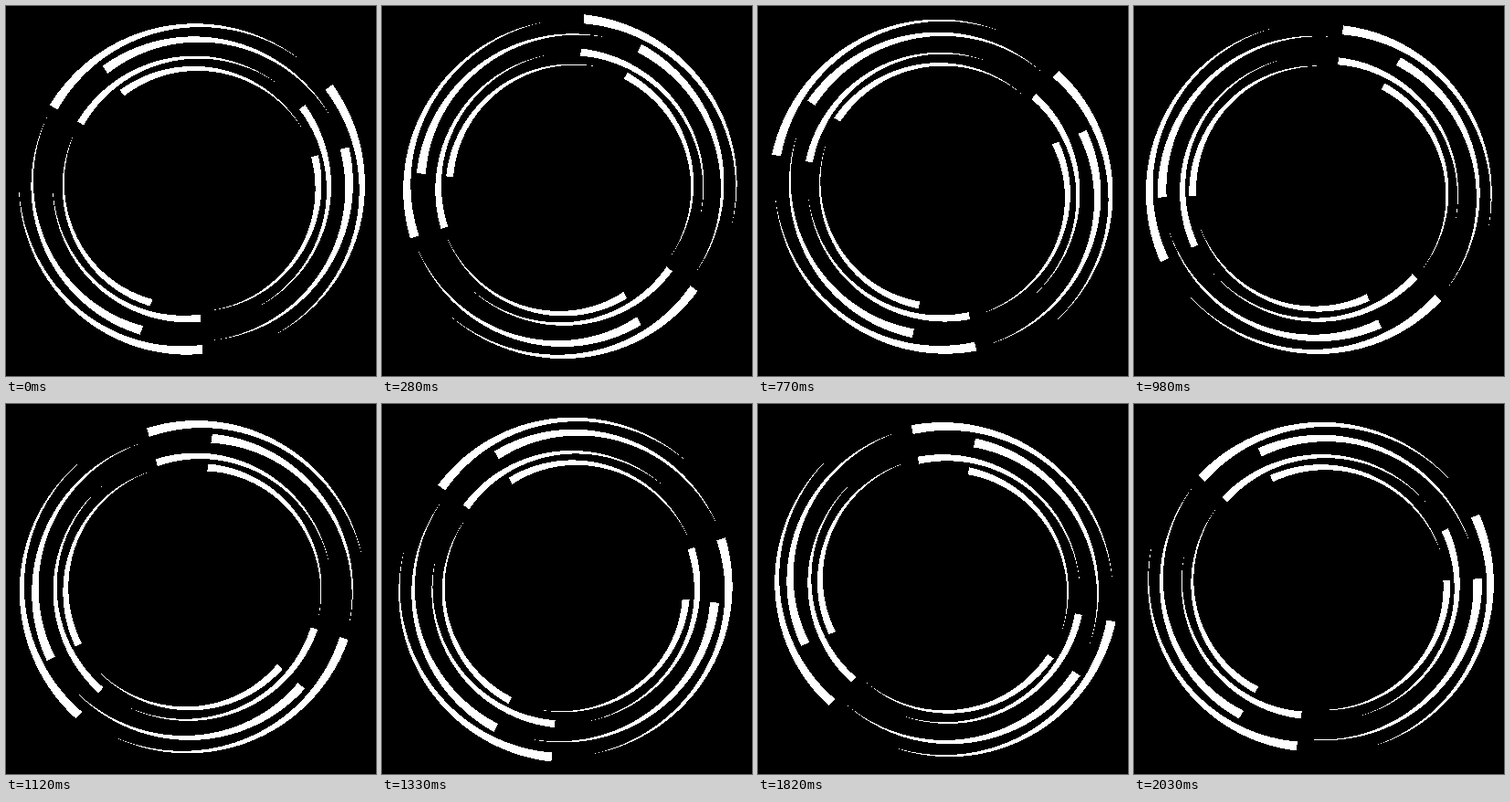
These frames come from a looping animation (405 px wide and 405 px high, 2.1 s). An HTML page:

```html
<!DOCTYPE html>
<html lang="en">
<head>
<meta charset="utf-8">
<title>Rotating arcs</title>
<style>
  html, body { margin: 0; width: 100%; height: 100%; overflow: hidden; background: #000; }
  svg { display: block; width: 100vw; height: 100vh; }
</style>
</head>
<body>
<svg viewBox="0 0 405 405" fill="#fff" shape-rendering="crispEdges">
  <g id="spinner">
    <path id="blades"/>
    <use href="#blades" transform="scale(.805)"/>
  </g>
</svg>
<script>
const CENTER = [203.4, 200.4];
const STEPS = 30;
const STEP_MS = 70;
const HEAD_WIDTH = 10;
const SEGMENTS = 64;

// Angles in degrees, counterclockwise; radii follow the outer edge.
const arcs = [
  { head: 149.4, tail: 50, radii: [180.7, 180.6, 184.8] },
  { head: 36.6, tail: -61, radii: [191.9, 188.5, 183.6] },
  { head: 273.8, tail: 178, radii: [180.8, 185.2, 189.5] },
  { head: 126, tail: 27, radii: [166.4, 167.6, 171.4] },
  { head: 15, tail: -82, radii: [178, 172.6, 167] },
  { head: 250.4, tail: 153.5, radii: [169, 174.4, 177] }
];

const quadratic = ([a, m, b], u) =>
  a * (1 - u) * (1 - 2 * u) + 4 * m * u * (1 - u) + b * u * (2 * u - 1);

function polar(radius, degrees) {
  const t = degrees * Math.PI / 180;
  return `${(radius * Math.cos(t)).toFixed(2)} ${(-radius * Math.sin(t)).toFixed(2)}`;
}

// A crescent: full width at the head, tapering to nothing at the tail.
function crescent({ head, tail, radii }) {
  const outer = [], inner = [];
  for (let i = 0; i <= SEGMENTS; i++) {
    const u = i / SEGMENTS;
    const angle = head + (tail - head) * u;
    const radius = quadratic(radii, u);
    outer.push(polar(radius, angle));
    inner.unshift(polar(radius - HEAD_WIDTH * (1 - u), angle));
  }
  return `M${[...outer, ...inner].join("L")}Z`;
}

const spinner = document.getElementById("spinner");
document.getElementById("blades").setAttribute("d", arcs.map(crescent).join(""));

function render(ms) {
  const step = Math.floor(ms / STEP_MS) % STEPS;
  spinner.setAttribute("transform", `translate(${CENTER}) rotate(${-step * 360 / STEPS})`);
}

const start = performance.now();
function tick(now) {
  render(Math.max(0, now - start));
  requestAnimationFrame(tick);
}
render(0);
requestAnimationFrame(tick);
</script>
</body>
</html>
```
